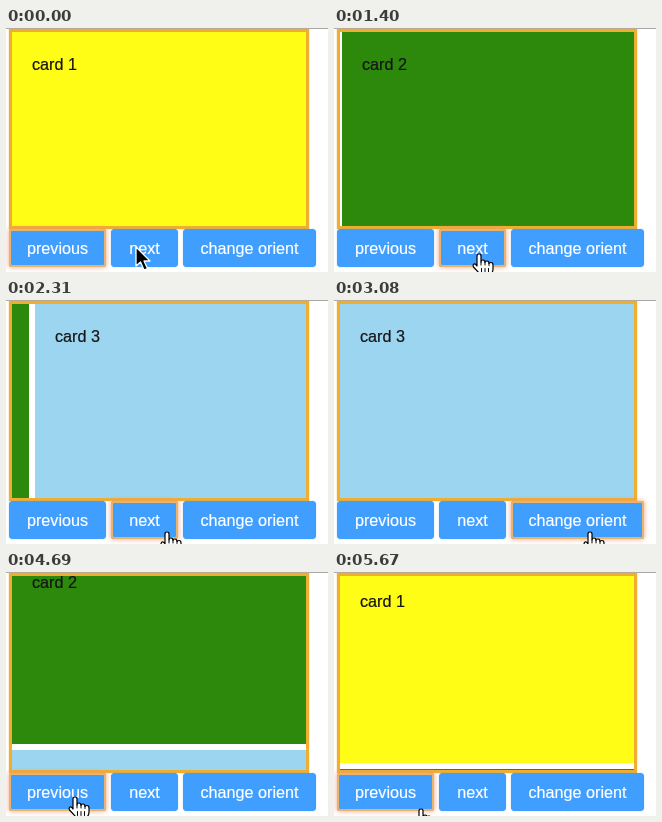
Write an HTML page that moves like this. It is 322 px wide and 244 px high and loops after 5.74 s.

```html
<!DOCTYPE html>
<html lang="en">
<head>
<meta charset="utf-8">
<title>Card slider</title>
<style>
  html, body { margin: 0; width: 100%; height: 100%; overflow: hidden; background: #fff; }
  body {
    position: relative; font: 16.2px/20px "Liberation Sans", Arial, sans-serif;
    -webkit-text-stroke: .2px;
  }
  body::before { content: ""; position: absolute; top: 0; width: 322px; height: 1px; background: #aaa; }
  #slider {
    position: absolute; left: 3px; top: 1px; width: 294px; height: 194px;
    border: 3px solid #efae30; box-shadow: 0 0 1px #efae30; overflow: hidden;
  }
  .card {
    position: absolute; box-sizing: border-box; width: 294px; height: 194px;
    padding: 22px 20px; color: #151515;
  }
  .button {
    position: absolute; top: 201px; height: 38px; line-height: 38px;
    border-radius: 4px; background: #409eff; box-shadow: 0 0 1px #409eff;
    color: #fff; text-align: center; white-space: nowrap;
  }
  .focus {
    border-radius: 3px;
    box-shadow: inset 0 0 0 2px #e6b46c, 0 0 4px 1px rgba(242, 150, 115, .65);
  }
  svg { position: absolute; left: 0; top: 0; overflow: visible; }
</style>
</head>
<body>
<div id="slider">
  <div class="card" style="background:#fffd16">card 1</div>
  <div class="card" style="background:#2d890c">card 2</div>
  <div class="card" style="background:#9cd5f0">card 3</div>
</div>
<div class="button" style="left:3px;width:97px">previous</div>
<div class="button" style="left:105px;width:67px">next</div>
<div class="button" style="left:177px;width:133px">change orient</div>
<svg id="cursor" width="24" height="24" stroke-linejoin="round" stroke-linecap="round">
  <path id="arrow" d="M0 0V19L4.5 15L8 23L11.5 21.500L8 14H14Z" fill="#000" stroke="#fff" stroke-width="1.3"/>
  <g id="hand" fill="#fff" stroke="#000" stroke-width="1.2">
    <path d="M-2 12V2Q-2 0 0 0Q2 0 2 2V8Q2 6 4 6Q6 6 6 8.500Q6 7 8 7Q10 7 10 9.500Q10 8.500 12 8.500Q14 8.500 14 11V15Q14 18 12 20V23H1V20L-5.500 13Q-6.500 11 -5 10Q-3.500 9.500 -2 12Z"/>
    <path d="M2 8V11M6 8.500V11M10 9.500V11.500M2.500 14.500V18.500M6 14.500V18.500M9.500 14.500V18.500" fill="none" stroke-width="1"/>
  </g>
</svg>
<script>
const LOOP = 5740, SLIDE = 680, TURN = 2940;
const slides = [[802, 1], [1858, 1], [4297, -1], [5150, -1]];   // start, direction
const focusChanges = [[0, 0], [730, 1], [2870, 2], [4220, 0]];  // time, button
const path = [                                                  // time, x, y
  [0, 130, 219], [420, 144, 225], [1400, 145, 226], [1800, 150, 228], [2310, 161, 232],
  [2450, 165, 233], [2730, 256, 232], [3430, 256, 232], [4060, 69, 225],
  [5250, 69, 225], [5670, 87, 237], [LOOP, 91, 240]
];
const cards = document.querySelectorAll(".card");
const buttons = document.querySelectorAll(".button");
const $ = id => document.getElementById(id);
const clamp = v => Math.min(1, Math.max(0, v));

// The CSS "ease" curve, cubic-bezier(.25, .1, .25, 1).
function ease(x) {
  const bezier = (a, b, s) => 3 * a * s * (1 - s) ** 2 + 3 * b * s * s * (1 - s) + s ** 3;
  let low = 0, high = 1;
  for (let i = 0; i < 24; i++) {
    const mid = (low + high) / 2;
    if (bezier(.25, .25, mid) < x) low = mid; else high = mid;
  }
  return bezier(.1, 1, low);
}

function pointer(t) {
  const i = path.findIndex(p => p[0] > t);
  const [t0, x0, y0] = path[i - 1], [t1, x1, y1] = path[i];
  const k = (t - t0) / (t1 - t0), s = k * k * (3 - 2 * k);
  return [x0 + (x1 - x0) * s, y0 + (y1 - y0) * s];
}

function draw(t) {
  let page = 0;
  for (const [start, dir] of slides) {
    const k = clamp((t - start) / SLIDE);
    if (k > 0) page += dir * (k < 1 ? ease(k) : 1);
  }
  cards.forEach((card, i) => {
    const d = i - page;
    card.style.transform = t < TURN
      ? `translateX(${Math.round(d * 300)}px)`
      : `translateY(${Math.round(d * 200)}px)`;
  });

  const focused = focusChanges.filter(f => f[0] <= t).pop()[1];
  buttons.forEach((b, i) => b.classList.toggle("focus", i === focused));

  const [x, y] = pointer(t);
  $("cursor").style.transform = `translate(${x}px, ${y}px)`;
  $("arrow").style.display = t < 140 ? "" : "none";
  $("hand").style.display = t < 140 ? "none" : "";
}

const begin = performance.now();
function tick() {
  draw((performance.now() - begin) % LOOP);
  requestAnimationFrame(tick);
}
tick();
</script>
</body>
</html>
```
